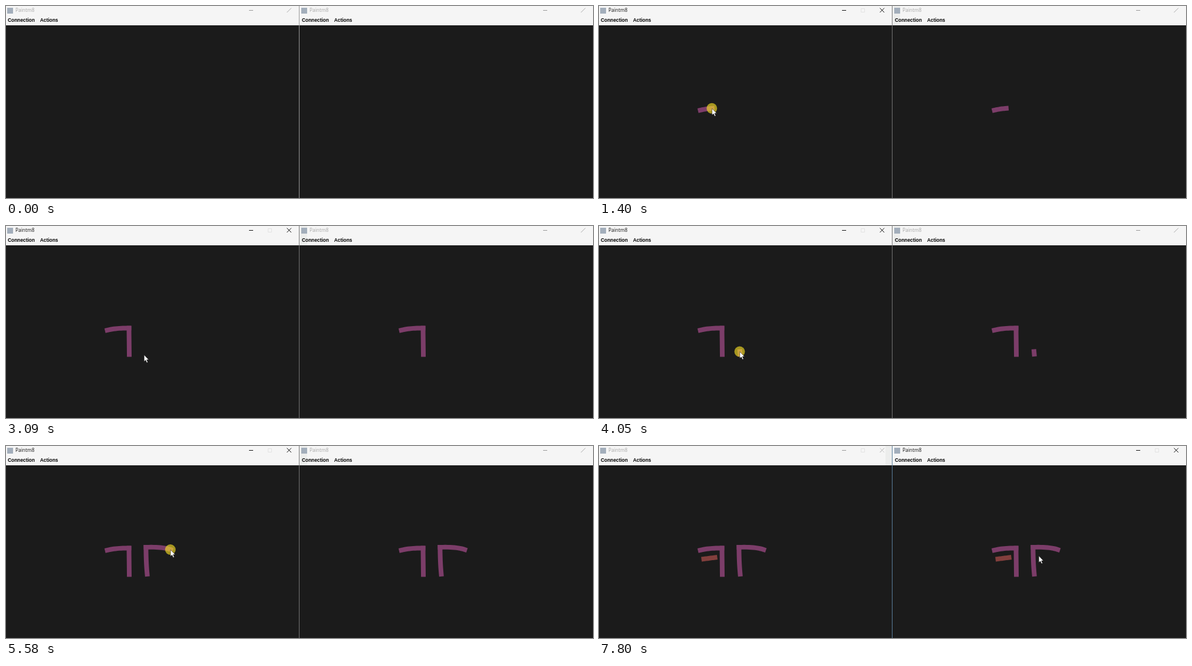
Write an HTML page that moves like this. It is 1000 px wide and 328 px high and loops after 8 s.

```html
<!DOCTYPE html>
<html lang="en">
<head>
<meta charset="utf-8">
<title>Shared drawing</title>
<style>
  html, body { margin: 0; width: 100%; height: 100%; overflow: hidden; background: #1b1b1b; }
  svg { display: block; width: 100vw; height: 100vh; }
  .title { font: 8.4px "Open Sans", "Noto Sans", sans-serif; }
  .menu { font: bold 8.4px "Liberation Sans", Arial, sans-serif; fill: #000; }
  .ink { fill: none; stroke-width: 8; stroke-linecap: square; }
</style>
</head>
<body>
<svg id="stage" viewBox="0 0 1000 328" preserveAspectRatio="none"></svg>
<script>
const LOOP = 8000;
const OFFSET = 501;
const APPEAR = 210, FOCUS_LEFT = 930, FOCUS_RIGHT = 6620;
const PURPLE = '#7c3d69', BROWN = '#823f3d';
const stage = document.getElementById('stage');

const linear = k => k;
const easeOut = k => 1 - (1 - k) ** 3;
const easeInOut = k => k * k * (3 - 2 * k);

// Each gesture continues from where the previous one ended.
const gestures = [];
let pen = [325, 326];

function glide(start, end, to, { via, ease = easeInOut, color, down = !!color } = {}) {
  const middle = [(pen[0] + to[0]) / 2, (pen[1] + to[1]) / 2];
  gestures.push({ start, end, from: pen, via: via || middle, to, ease, color, down });
  pen = to;
}
const press = time => glide(time, time + 1, pen, { down: true });
const draw = (start, end, to, color, options) => glide(start, end, to, { color, ...options });

glide(APPEAR, 890, [172, 178], { via: [258, 212], ease: linear });
press(FOCUS_LEFT);
draw(1230, 1910, [209, 174.5], PURPLE, { via: [188, 174], ease: easeOut });
draw(2170, 2850, [209.5, 219.5], PURPLE);
glide(2850, 3090, [235, 220]);
glide(3320, 3570, [240, 219]);
press(3780);
draw(3940, 4490, [238, 173], PURPLE, { via: [238, 198] });
draw(4960, 5580, [280, 177], PURPLE, { via: [266, 172] });
glide(5600, 5740, [291, 181]);
glide(5770, 6300, [693, 207], { via: [450, 212] });
glide(6300, 6420, [679, 193]);
press(FOCUS_RIGHT);
draw(6780, 7220, [698, 190.5], BROWN);
glide(7420, 7800, [749, 187.5], { via: [724, 204] });

function add(parent, tag, attrs, text) {
  const node = document.createElementNS('http://www.w3.org/2000/svg', tag);
  set(node, attrs);
  if (text) node.textContent = text;
  parent.appendChild(node);
  return node;
}

function set(node, attrs) {
  for (const key in attrs) node.setAttribute(key, attrs[key]);
}

const show = (node, on) => set(node, { visibility: on ? 'visible' : 'hidden' });

function makeWindow(x, edgeX) {
  const g = add(stage, 'g', { transform: `translate(${x} 0)` });
  add(g, 'rect', { x: -1, width: 500, height: 33, fill: '#f5f5f5' });
  const edge = add(g, 'rect', { x: edgeX, width: 12, height: 33, fill: '#ecedec' });
  add(g, 'rect', { x: 2, y: 3, width: 10, height: 10, fill: '#a3aebb' });
  const title = add(g, 'text', { x: 16, y: 10.2, class: 'title' }, 'Paintm8');
  add(g, 'text', { x: 3, y: 27, class: 'menu' }, 'Connection');
  add(g, 'text', { x: 58, y: 27, class: 'menu' }, 'Actions');
  const line = (d, stroke) => add(g, 'path', { d, stroke, fill: 'none' });
  const dash = line('M414 7.5h7');
  const slash = line('M478.5 11l7.5-7.5');
  const backslash = line('M478.5 3.5l7.5 7.5');
  const box = line('M446.5 4.5h6v6h-6z', '#e2e2e2');

  return (active, visited, otherActive) => {
    set(title, { fill: active ? '#111' : '#a8a8a8' });
    set(dash, { stroke: active ? '#111' : '#999' });
    set(slash, { stroke: active ? '#111' : '#aaa' });
    set(backslash, { stroke: active ? '#111' : '#c8c8c8' });
    show(backslash, visited);
    show(box, visited);
    show(edge, otherActive);
  };
}

add(stage, 'rect', { width: 1000, height: 328, fill: '#1b1b1b' });
const left = makeWindow(0, 488);
const right = makeWindow(OFFSET, 0);
const divider = add(stage, 'rect', { x: 499, width: 1, height: 328 });
const inks = gestures.filter(g => g.color).map(gesture => {
  const home = gesture.from[0] > OFFSET ? -OFFSET : 0;
  const paths = [home, home + OFFSET].map(dx => add(stage, 'path', {
    class: 'ink', stroke: gesture.color, transform: `translate(${dx + 0.5} 0)`
  }));
  return { gesture, paths };
});
const halo = add(stage, 'circle', { r: 9, fill: '#fbe424', opacity: 0.62 });
const arrow = add(stage, 'path', {
  d: 'M0 0V11.2L2.6 8.9L4.5 13.2L6.3 12.4L4.4 8.2H7.8Z',
  fill: '#fff', stroke: '#111', 'stroke-width': 0.5
});

function along({ from, via, to }, k) {
  return [0, 1].map(i =>
    (1 - k) ** 2 * from[i] + 2 * k * (1 - k) * via[i] + k * k * to[i]);
}

function progress({ start, end, ease }, t) {
  return ease(Math.min(1, Math.max(0, (t - start) / (end - start))));
}

function trail(gesture, t) {
  const reach = progress(gesture, t);
  if (!reach) return '';
  const steps = 12;
  const points = Array.from({ length: steps + 1 }, (_, i) => along(gesture, reach * i / steps));
  return 'M' + points.map(p => p.join(' ')).join('L');
}

function render(t) {
  const leftActive = t >= FOCUS_LEFT && t < FOCUS_RIGHT;
  const rightActive = t >= FOCUS_RIGHT;
  left(leftActive, t >= FOCUS_LEFT, rightActive);
  right(rightActive, rightActive, leftActive);
  set(divider, { fill: rightActive ? '#5b7f9c' : leftActive ? '#747474' : '#999' });

  for (const { gesture, paths } of inks) {
    const d = trail(gesture, t);
    for (const path of paths) set(path, { d });
  }

  const current = gestures.filter(g => g.start <= t).pop() || gestures[0];
  const [x, y] = along(current, progress(current, t));
  set(halo, { cx: x, cy: y });
  show(halo, current.down);
  set(arrow, { transform: `translate(${x + 0.3} ${y + 0.3})` });
  show(arrow, t >= APPEAR);
}

const began = performance.now();
function tick() {
  render((performance.now() - began) % LOOP);
  requestAnimationFrame(tick);
}
render(0);
requestAnimationFrame(tick);
</script>
</body>
</html>
```
